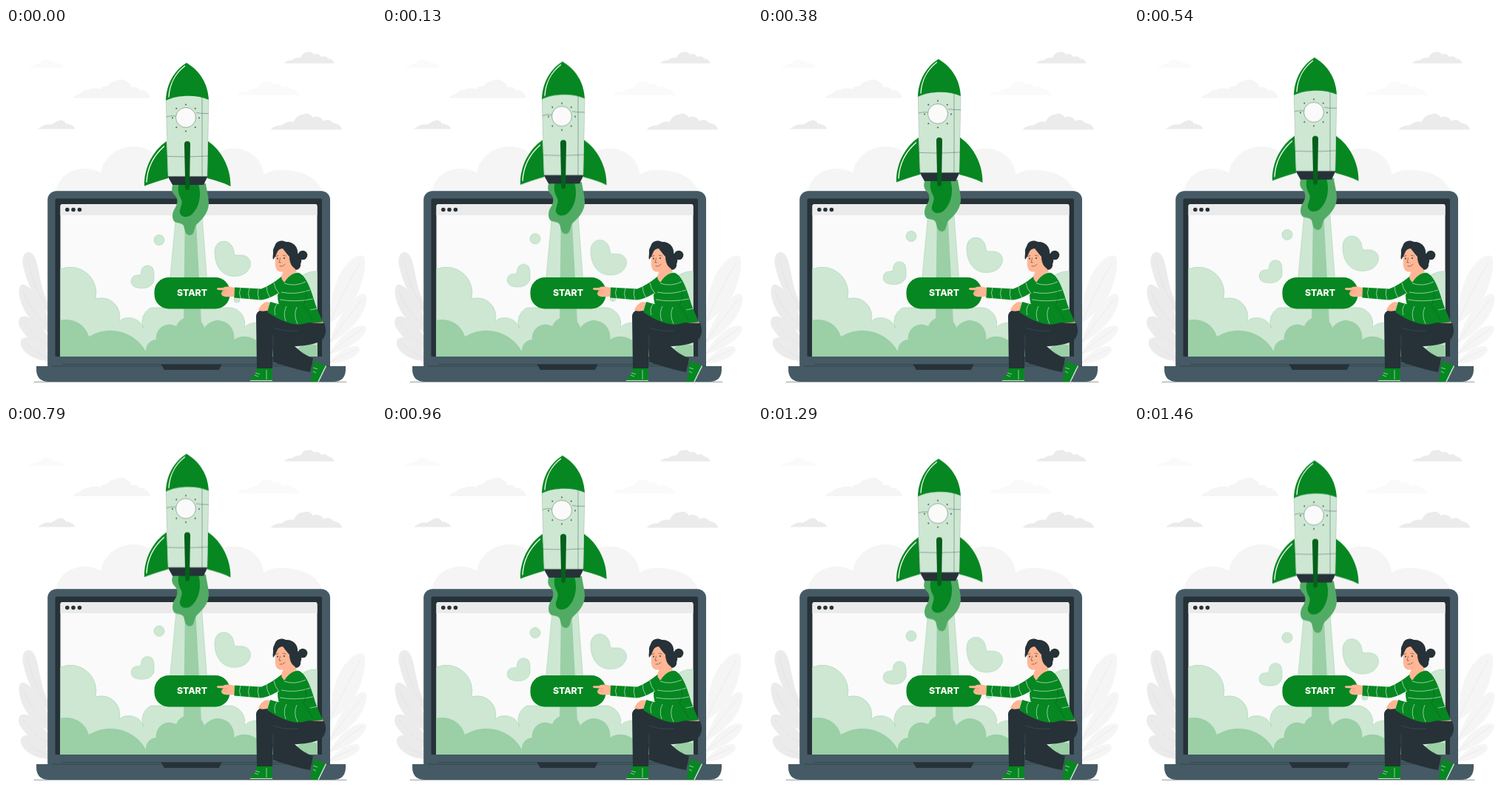
Animation, 500 px wide and 500 px high, one loop 1500 ms. Source, as an HTML page:

```html
<!DOCTYPE html>
<html lang="en">
<head>
<meta charset="utf-8">
<title>Rocket start</title>
<style>
  html, body { margin: 0; width: 100%; height: 100%; overflow: hidden; background: #fff; }
  svg { display: block; width: 100vw; height: 100vh; }
  .green { fill: #068721; }
  .deep { fill: #04611a; }
  .pale { fill: #cde7d3; }
  .mid { fill: #9bcfa6; }
  .flame { fill: #51ab64; }
  .steel { fill: #455a64; }
  .dark { fill: #263238; }
  .skin { fill: #ffb694; }
  .g1 { fill: #ebebeb; }
  .g2 { fill: #f5f5f5; }
  .g3 { fill: #fafafa; }
  .line { fill: none; stroke: #263238; stroke-width: .5; stroke-linecap: round; }
  .shine { fill: none; stroke: #fff; stroke-width: 1.3; stroke-linecap: round; }
  .stripe { fill: none; stroke: #cde7d3; stroke-width: .7; }
  .edge { stroke: #9bcfa6; stroke-width: .5; }
  .float { animation: float 1.5s linear infinite; }
  @keyframes float { 50% { transform: translateY(-10px); } }
  text { font: 800 12.3px Inter, "Open Sans", sans-serif; fill: #fff; text-anchor: middle; }
</style>
</head>
<body>
<svg viewBox="0 0 500 500">
  <defs>
    <path id="cloudA" d="M0 24.500C2 21 7 20 11 18C13 15 17 14 20 14C25 11 31 12 36 13C38 9 42 9 45 9C47 3 53 3 56 3C60-1 66 0 69 3C73 4 75 8 76 11C80 9 84 10 86 14C92 13 98 17 100 24.500Z"/>
    <path id="cloudB" d="M0 23.500C2 19 9 17 16 17C19 13 27 11 32 12C35 5 40 1 46 1C52-1 57 1 59 6C64 3 71 5 74 11C79 8 84 9 88 14C94 14 99 18 100 23.500Z"/>
    <clipPath id="screen"><path d="M73.500 444V241Q73.500 238 76.500 238H417.500Q420.500 238 420.500 241V444Z"/></clipPath>
  </defs>

  <!-- sky -->
  <path class="g2" d="M68 222C68 206 84 190 106 190C114 190 122 192 128 196C132 175 150 160 172 160C188 160 202 168 210 181L282 173C290 165 301 161 312 163C333 165 347 180 348 198C356 193 366 191 376 192C400 192 424 204 427 222Z"/>
  <use href="#cloudB" class="g3" transform="translate(31 42.500) scale(.47)"/>
  <use href="#cloudB" class="g1" transform="translate(376.500 32) scale(.67)"/>
  <use href="#cloudA" class="g2" transform="translate(90 69) scale(1.05)"/>
  <use href="#cloudB" class="g3" transform="translate(313 72) scale(.83 .8)"/>
  <use href="#cloudA" class="g1" transform="translate(43 124.200) scale(.5)"/>
  <use href="#cloudB" class="g1" transform="translate(358 115.500) scale(.96 .94)"/>

  <!-- leaves -->
  <g class="g1">
    <path d="M58 386C40 370 28 345 23 321C21 309 25 302 31 303C42 305 43 326 48 346C50 357 54 366 58 372Z"/>
    <path d="M58 411C40 405 22 385 18 362C16 350 20 345 25 347C38 352 50 374 58 392Z"/>
    <path d="M58 436C44 432 26 418 18 403C15 392 20 388 28 390C40 394 51 408 58 418Z"/>
    <path d="M58 450C42 450 24 441 20 428C18 419 26 416 34 419C44 423 52 433 58 440Z"/>
  </g>
  <path d="M29 311C34 337 44 363 58 381M23 356C32 378 45 395 58 403M23 397C35 413 47 423 58 428M27 426C38 436 48 442 58 446" fill="none" stroke="#e0e0e0" stroke-width=".6"/>
  <g class="g2">
    <path d="M437 399C437 372 444 338 460 320C470 308 481 304 484 310C488 320 482 347 472 364C462 381 448 392 437 399Z"/>
    <path d="M437 426C444 400 461 372 476 362C484 356 489 360 487 370C484 389 464 412 437 426Z"/>
    <path d="M437 441C445 424 461 408 476 403C484 400 489 404 486 410C478 425 455 437 437 441Z"/>
    <path d="M437 453C446 439 460 431 472 430C480 430 479 437 474 441C464 449 450 454 437 453Z"/>
  </g>
  <path d="M479 316C464 342 450 370 437 398M482 366C466 386 450 405 437 425M481 407C465 418 450 429 437 440M473 435C460 440 448 446 437 452" fill="none" stroke="#e4e4e4" stroke-width=".6"/>

  <!-- laptop -->
  <path d="M38 478.300H460" class="line"/>
  <rect class="steel" x="56.200" y="220.300" width="381.800" height="250" rx="12"/>
  <path class="dark" d="M66.500 444V232.500Q66.500 230.500 68.500 230.500H425Q427 230.500 427 232.500V444Z"/>
  <g clip-path="url(#screen)">
    <path class="g3" d="M73 237H421V445H73Z"/>
    <path class="g1" d="M73 237H421V253H73Z"/>
    <g class="dark"><circle cx="82.800" cy="245.500" r="2.800"/><circle cx="91" cy="245.500" r="2.800"/><circle cx="99.400" cy="245.500" r="2.800"/></g>
    <path class="pale edge" d="M73 326A35 35 0 0 1 121 366A25 25 0 0 1 153 396A21 21 0 0 1 186 406A21 21 0 0 1 196 378H305A22 22 0 0 1 322 405A20 20 0 0 1 352 405L395 385A33 33 0 0 1 393 342A30 30 0 0 1 421 329V445H73Z"/>
    <path class="pale edge" d="M231 240L221 345V360H272V345L264 240Z"/>
    <path class="mid" d="M242 245L240 400H264L261 340L256 245Z"/>
    <path class="mid" d="M73 395A32 32 0 0 1 112 417A55 55 0 0 1 189 437A15 15 0 0 1 203 421A18 18 0 0 1 230 403A20 20 0 0 1 268 405A22 22 0 0 1 308 421A26 26 0 0 1 345 430V445H385A28 28 0 0 1 421 429V445H73Z"/>
  </g>
  <path class="steel" d="M41 457H459V461Q459 478 442 478H58Q41 478 41 461Z"/>
  <path class="line" d="M77 454.500H420M62 457H437"/>
  <path class="dark" d="M209.500 454.500H291.500L288 462H214Z"/>

  <!-- rocket, flame and loose puffs -->
  <g class="float">
    <g class="pale edge">
      <circle cx="207" cy="286.500" r="7"/>
      <path d="M183 328C184 321 192 319 197 323C201 327 200 336 200 341C198 350 188 353 178 351C170 350 167 343 171 337C174 333 179 335 182 333C183 332 182 330 183 328Z"/>
      <path d="M282 303C282 292 289 287 297 288.500C304 290 308 297 308 304C309 308 313 307 319 307C328 308 332 315 330 322C327 332 317 336 307 335.500C293 335 282 323 282 303Z"/>
      <circle cx="312" cy="367" r="4"/>
    </g>
    <path class="flame" d="M226 210C223 217 224 222 228 226C233 231 232 238 228 244C224 250 224 259 228 262C232 264 237 263 240 267C242 272 241 279 248 280C256 280 253 270 258 265C264 259 273 252 274 238C274 228 271 219 270 210Z"/>
    <path class="green" d="M234 210C231 220 234 226 237 232C240 239 232 246 236 252C240 257 248 256 253 250C259 243 262 234 262 224C262 219 261 214 260 210Z"/>
    <path class="green" d="M217 153C199 165 186 189 187 213.500C198 209 209 206 219 203ZM273 153C291 165 304 189 303.500 214C294 209 283 206 272 203Z"/>
    <path class="shine" d="M213.500 160C200 172 191 189 190 208"/>
    <path class="pale" d="M216 97C225 88 265 88 274 97L272 201H219Z"/>
    <path class="line" d="M216.200 98L219 200M272 200L274 98" opacity=".3"/>
    <path class="line" d="M217 120Q223 118 229.500 119M257.500 114.500Q265 116 273.500 115.500M218 173.500Q245 175 272.500 173M265 93V200" opacity=".75"/>
    <path class="green" d="M244 47C228 57 217 74 216 98C233 90 258 90 274 97C273 75 262 58 244 47Z"/>
    <path class="shine" d="M241.500 51.500C229 61 221 76 220 93"/>
    <circle cx="243" cy="121" r="13.500" fill="#fafafa" stroke="#5f8068" stroke-width=".6"/>
    <circle cx="243" cy="121.500" r="18" fill="none" stroke="#465e4e" stroke-width="2" stroke-linecap="round" pathLength="80" stroke-dasharray="0 10" transform="rotate(-90 243 121.500)"/>
    <path class="dark" d="M218.500 200.500H272.500L267 212H225Z"/>
    <path class="deep" d="M241 157Q241 153 245 153T249 157L248 216Q247.500 219 245 219T242.300 216Z"/>
  </g>

  <!-- button -->
  <rect class="green" x="200.500" y="337" width="102" height="42.500" rx="19.500"/>
  <text x="251.500" y="361.700">START</text>

  <!-- woman -->
  <path class="dark" d="M361 422L388 428C396 436 405 443 415 446L411 465C394 462 375 456 361 451Z"/>
  <path class="green" d="M417 449C422 453 428 454 432 456L421 478H411C412 472 415 468 413 463Z"/>
  <path d="M432.500 456.500L422 478" stroke="#cde7d3" stroke-width="1.500"/>
  <path class="stripe" d="M415 459L421 461M415 464L419 466"/>
  <path class="green" d="M337 457H360L360 476H330C330 471 336 470 338 466Z"/>
  <path d="M330 476.500H360" stroke="#cde7d3" stroke-width="1"/>
  <path class="stripe" d="M337 466L343 468M336 469L341 471M352 462V475"/>
  <path class="skin" d="M405 393L428 396L429 401L404 400Z"/>
  <path class="dark" d="M338 389C339 380 350 379 360 384C376 392 396 398 430 399C434 408 432 419 425 423C412 430 390 431 361 430L360 460H339Z"/>
  <path class="line" d="M362 405C372 409 384 410 394 409M361 430V416" style="stroke:#455a64"/>

  <circle class="dark" cx="401" cy="307" r="6.300"/>
  <path class="dark" d="M363 297C363 289 371 285 378 289C388 288 395 296 394 304C400 309 400 315 398 319C399 325 393 329 387 326L372 310Z"/>
  <path class="green" d="M371 337C379 339 391 327 398 332C408 339 413 357 419 376L428 397.500C415 399 400 398 387 397C374 390 367 375 367 361C371 352 370 343 371 337Z"/>
  <path class="skin" d="M376 326L371 338C373 340 375 342 376 344C381 336 388 331 393 330L387 318Z"/>
  <path class="skin" d="M364 301C370 294 380 296 383 304C385 309 386 316 386 321C383 327 378 330 371 329.500C365 329 363 322 364 315Z"/>
  <path class="dark" d="M372 290C366 290 360 296 361 304C361 307 360 310 361 313C364 310 365 306 367 302C369 299 371 298 374 298C378 303 380 306 383 309C383 317 386 323 392 326L393 303C391 294 381 288 372 290Z"/>
  <circle class="dark" cx="367" cy="311.500" r=".9"/><circle class="dark" cx="376" cy="311" r=".9"/>
  <path class="line" d="M364.500 308.500L368 307.500M374 307L378 308M370.500 311L369 317H371.500M370 322Q374 323 377 319.500"/>

  <path class="green" d="M372 336C364 343 354 349 345 352.500L309 350.500C307 355 307 360 308.500 364.500L344 367.500C354 367 366 360 376 353Z"/>
  <path class="skin" d="M309 351.500C304 349 298 349 293 351L286 351.300C284 352 285 353.500 287 354L294 354.500C290 357 290 361 294 362.500C299 364 305 363 308.500 363Z"/>
  <path class="line" d="M294 354.500L299 355M292 358L298 358" style="stroke:#d98a68"/>
  <path class="skin" d="M356 371C350 368 344 374 341 381C345 384 351 382 355 382Z"/>
  <path class="green" d="M357 370C372 375 390 377 402 374L414 394C408 400 396 402 386 399.500C374 397 362 390 353 384Z"/>
  <path class="stripe" d="M317 351Q314 358 317 365M329 351.500Q326 359 329 366M341 352.500Q339 360 342 367M352 349Q352 357 357 365M362 344Q363 352 369 359M376 345Q390 350 405 343M372 357Q391 361 411 354M370 367Q391 371 415 366M366 373Q361 380 364 388M379 376Q374 385 378 396M393 377Q388 388 394 400M411 381L421 379"/>
  <path class="line" d="M402 374Q407 366 405 354M402 374L414 394" style="stroke:#04611a"/>
</svg>
</body>
</html>
```
